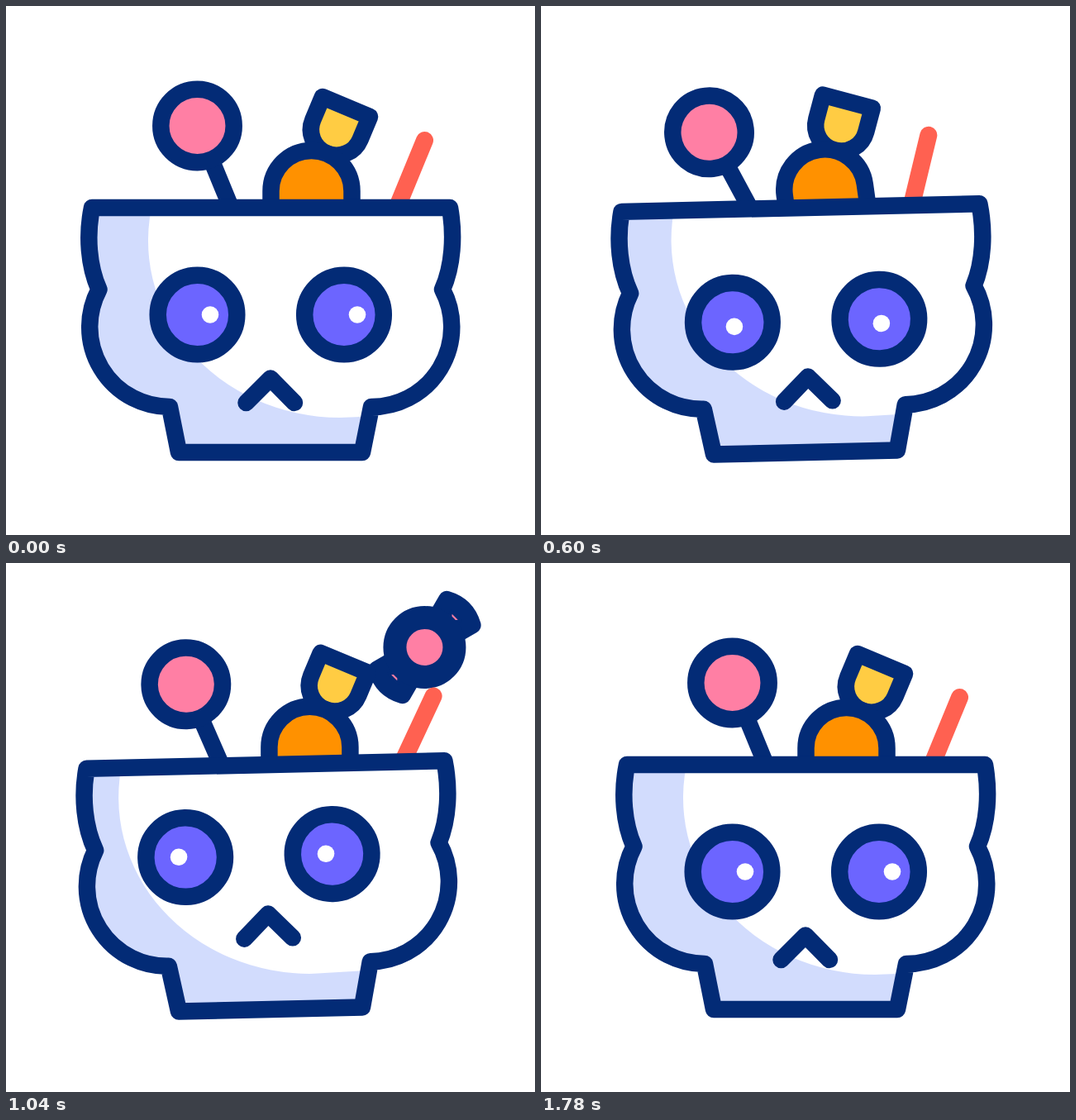
Write an HTML page that moves like this. It is 640 by 640 pixels and loops after 2400 ms.

```html
<!DOCTYPE html>
<html lang="en">
<head>
<meta charset="utf-8">
<title>Skull candy bowl</title>
<style>
  html, body { margin: 0; width: 100%; height: 100%; overflow: hidden; background: #fff; }
  svg { display: block; width: 100vw; height: 100vh; }
  .ink { stroke: #032b76; stroke-width: 20.5; stroke-linecap: round; stroke-linejoin: round; }
</style>
</head>
<body>
<svg viewBox="0 0 640 640">
  <defs>
    <path id="bowl" d="M104 244H537C543 278 540.5 315 528 343A96.7 96.7 0 0 1 442 485L431 540H209L198 485A96.7 96.7 0 0 1 112.500 343C100 315 97 278 104 244Z"/>
    <clipPath id="inside"><use href="#bowl"/></clipPath>
    <g id="wrap">
      <path class="ink" fill="#032b76" d="M30 -14L60 -22Q72 0 60 22L30 14Z"/>
      <path fill="#ff7fa4" d="M46 0L52 -5V5Z"/>
    </g>
    <circle id="eye" class="ink" r="47.800" fill="#6c65ff"/>
    <circle id="glint" r="10.300" fill="#fff"/>
  </defs>

  <g id="flyer">
    <g transform="rotate(-45)">
      <use href="#wrap"/>
      <use href="#wrap" transform="scale(-1 1)"/>
      <circle r="36" fill="#ff7fa4" stroke="#032b76" stroke-width="28"/>
    </g>
  </g>

  <g id="body">
    <g id="straw">
      <path d="M0 0L-74 180" stroke="#ff6151" stroke-width="21" stroke-linecap="round"/>
    </g>
    <g id="lolly">
      <path class="ink" d="M0 0L78 190"/>
      <circle class="ink" r="44.200" fill="#ff7fa4"/>
    </g>
    <g id="bottle">
      <path class="ink" fill="#ffcc43" transform="translate(42 -102) rotate(22.800)"
            d="M-31 0H31V30A31 31 0 0 1 -31 30Z"/>
      <path class="ink" fill="#ff9100" d="M-49 90V0A49 49 0 0 1 49 0V90Z"/>
    </g>
    <use href="#bowl" fill="#d2dcfd"/>
    <g clip-path="url(#inside)">
      <path id="light" fill="#fff" d="M404 498A232 214 0 0 1 178.400 234H760V490L480 495Z"/>
    </g>
    <use href="#bowl" class="ink" fill="none"/>
    <g id="eyes">
      <use href="#eye" x="231.500" y="373.500"/>
      <use href="#eye" x="409" y="373.500"/>
      <g id="glints">
        <use href="#glint" x="231.500" y="373.500"/>
        <use href="#glint" x="409.500" y="373.500"/>
      </g>
    </g>
    <path id="mouth" class="ink" fill="none" d="M290.500 480L320 450.500L349 480"/>
  </g>
</svg>
<script>
const LOOP = 2400;
const parts = Object.fromEntries(
  ['flyer', 'body', 'straw', 'lolly', 'bottle', 'light', 'eyes', 'glints', 'mouth']
    .map(id => [id, document.getElementById(id)]));

// Cubic Hermite curve through keys; flat at the ends.
function curve(times, values, slopeAt) {
  const last = times.length - 1;
  const slopes = values.map((_, i) => {
    if (i === 0 || i === last) return 0;
    const h0 = times[i] - times[i - 1], h1 = times[i + 1] - times[i];
    return slopeAt((values[i] - values[i - 1]) / h0, (values[i + 1] - values[i]) / h1, h0, h1);
  });
  return t => {
    if (t >= times[last]) return values[last];
    let i = 0;
    while (t >= times[i + 1]) i++;
    const h = times[i + 1] - times[i], u = (t - times[i]) / h, w = 1 - u;
    return w * w * ((1 + 2 * u) * values[i] + u * h * slopes[i])
         + u * u * ((3 - 2 * u) * values[i + 1] - w * h * slopes[i + 1]);
  };
}

// The skull stops at each extreme; the sweets overshoot a little.
const firm = (...values) => curve([0, 400, 800, 1040, 1200, 1500, 1780], values,
  (a, b) => a * b > 0 ? 2 * a * b / (a + b) : 0);
const loose = (...values) => curve([0, 420, 760, 1040, 1200, 1500, 1780], values,
  (a, b, h0, h1) => (a * h0 + b * h1) / (h0 + h1));

const tilt = firm(0, -18.2, 15.4, -1.2, -11.4, 2, 0);

const slides = {
  light:  [firm(0, -50, 32, -30, -49, -4, 0), () => 0],
  eyes:   [firm(0, -50, 57, -10, -43.5, -6, 0), firm(0, 8, 5.5, -19.6, -27.4, -2.8, 0)],
  glints: [firm(15.5, -22, 25.5, -8, -22, 11.5, 15.5), firm(0, 14.5, -4, -0.5, 0.5, 0, 0)],
  mouth:  [firm(0, -65, 74, 0, -42, -5, 0), firm(0, 0, -6.5, -26, -27.5, -3, 0)]
};

const sweets = {
  lolly: {
    x: 231.5, y: 145,
    dx: loose(0, -58.7, 18.4, -4.8, -49.6, -20.9, 0),
    dy: loose(0, 15.5, -4.7, -0.4, 3, -1.4, 0),
    turn: loose(0, -17, 7, 0, -4, 2, 0)
  },
  bottle: {
    x: 369.5, y: 224,
    dx: loose(0, -37, 1, 5, -35, -32, 0),
    dy: loose(0, -2.6, 0.5, 0, -0.3, 0, 0),
    turn: loose(0, -17, 4, 1.2, -4, 1, 0)
  },
  straw: {
    x: 506.5, y: 162.5,
    dx: loose(0, -49, -3.5, 19, -25.7, -37, 0),
    dy: loose(0, -5.5, 0.5, 3, -1.8, 0.5, 0),
    turn: loose(0, -16, 2, 4, -2.3, 2.3, 0)
  }
};

const move = (id, x, y, turn = 0) =>
  parts[id].setAttribute('transform', `translate(${x} ${y}) rotate(${turn})`);

function draw(t) {
  parts.body.setAttribute('transform', `rotate(${tilt(t)} 320 540)`);
  for (const [id, [x, y]] of Object.entries(slides)) move(id, x(t), y(t));
  for (const [id, s] of Object.entries(sweets)) move(id, s.x + s.dx(t), s.y + s.dy(t), s.turn(t));

  // One sweet is thrown out of the bowl on a parabola.
  const flying = t > 710 && t < 1400;
  parts.flyer.setAttribute('visibility', flying ? 'visible' : 'hidden');
  if (flying) move('flyer', 285 + 0.788 * (t - 760), 96 + 0.00341 * (t - 999) ** 2);
}

const start = performance.now();
function tick() {
  draw((performance.now() - start) % LOOP);
  requestAnimationFrame(tick);
}
tick();
</script>
</body>
</html>
```
